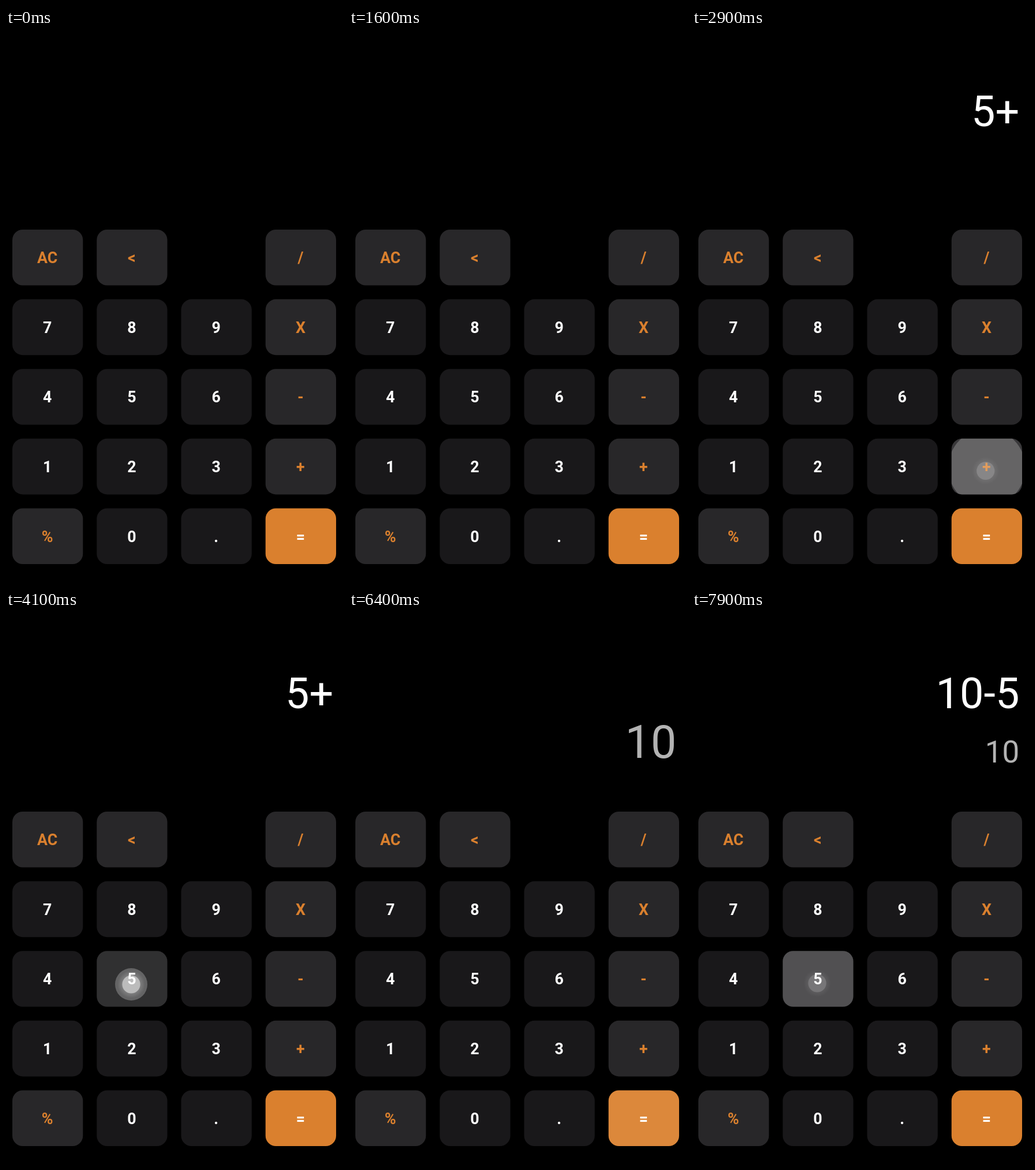
Animation, 584 px wide and 959 px high, one loop 8 s. Source, as an HTML page:

```html
<!DOCTYPE html>
<html lang="en">
<head>
<meta charset="utf-8">
<title>Calculator</title>
<style>
  html, body { margin: 0; width: 100%; height: 100%; overflow: hidden; background: #000; }
  svg { display: block; width: 584px; height: 959px; font-family: Roboto, sans-serif; }
  .label { font-size: 26.8px; font-weight: 700; text-anchor: middle; }
  .display { text-anchor: end; fill: #fff; }
  #result { fill: #b3b3b3; }
</style>
</head>
<body>
<svg viewBox="0 0 584 959">
  <defs>
    <clipPath id="keyClip"><rect id="clipBox"/></clipPath>
    <radialGradient id="glow">
      <stop offset=".6" stop-color="#fff" stop-opacity=".35"/>
      <stop offset="1" stop-color="#fff" stop-opacity="0"/>
    </radialGradient>
  </defs>
  <rect width="584" height="959"/>
  <g id="keys"></g>
  <g id="ink" clip-path="url(#keyClip)" fill="#fff">
    <rect id="highlight" width="584" height="959"/>
    <circle id="ripple"/>
  </g>
  <g id="labels"></g>
  <text id="input" class="display" x="567.4" y="170.3" font-size="73.8"></text>
  <text id="result" class="display" x="567.3"></text>
  <g id="touch">
    <circle r="24" fill="url(#glow)"/>
    <circle r="15.6" fill="#fff"/>
  </g>
</svg>
<script>
const $ = id => document.getElementById(id);
const DURATION = 8000, STEP = 100;
const KEY = { width: 122.3, height: 96.6, rx: 18 };
const ORANGE = '#da802e';
const ROWS = ['AC < _ /', '7 8 9 X', '4 5 6 -', '1 2 3 +', '% 0 . ='];

const set = (el, attrs) => {
  for (const name in attrs) el.setAttribute(name, attrs[name]);
  return el;
};
const add = (parent, tag, attrs) =>
  parent.appendChild(set(document.createElementNS('http://www.w3.org/2000/svg', tag), attrs));

const boxes = {};
ROWS.forEach((row, r) => row.split(' ').forEach((name, c) => {
  if (name === '_') return;
  const box = boxes[name] = { x: 11 + c * 146.25, y: 349 + r * 120.62, ...KEY };
  const isDigit = /[\d.]/.test(name), isEquals = name === '=';
  add($('keys'), 'rect', { ...box, fill: isEquals ? ORANGE : isDigit ? '#19181a' : '#282729' });
  add($('labels'), 'text', {
    class: 'label',
    x: box.x + KEY.width / 2 - .5,
    y: box.y + KEY.height / 2 + 9.8,
    fill: isDigit || isEquals ? '#fff' : ORANGE
  }).textContent = name;
}));

// Each press takes effect at `at`; the finger lands `lead` steps before.
const PRESSES = [
  { at: 1800, lead: 1, key: '5', x: 217, y: 646, input: '5' },
  { at: 2900, lead: 2, key: '+', x: 508.8, y: 766.5, input: '5+', radius: 67 },
  { at: 4200, lead: 2, key: '5', x: 217, y: 648, input: '5+5' },
  { at: 6200, lead: 2, key: '=', x: 510, y: 886, input: '', result: 'large' },
  { at: 7000, lead: 2, key: '-', x: 510, y: 646, input: '10-', result: 'small' },
  { at: 7900, lead: 2, key: '5', x: 217, y: 646, input: '10-5', result: 'small' }
];
const RESULT = {
  large: { 'font-size': 79, y: 256 },
  small: { 'font-size': 53, y: 264 }
};

// Ink by step relative to the press: highlight, ripple opacity, radius, touch dot.
const INK = {
  '-2': [0, 0, 0, .57],
  '-1': [.1, .25, 28, .57],
  '0': [.08, .22, 0, .22],
  '1': [.05, .13, 95, 0],
  '2': [.01, .05, 110, 0]
};

function drawInk(press, step) {
  const [highlight, opacity, radius, dot] = INK[step];
  const box = boxes[press.key];
  // The ripple drifts from the finger towards the key centre as it grows.
  const atFinger = step < 0;
  set($('clipBox'), box);
  set($('highlight'), { opacity: highlight });
  set($('ripple'), {
    cx: atFinger ? press.x : box.x + KEY.width / 2,
    cy: atFinger ? press.y : box.y + KEY.height / 2 + 2,
    r: radius || (step === 0 ? press.radius || 85 : 0),
    opacity: step === 0 && !press.radius ? .18 : opacity
  });
  set($('touch'), { transform: `translate(${press.x} ${press.y})`, opacity: dot });
}

function draw(time) {
  const t = Math.floor(time % DURATION / STEP) * STEP;
  const last = PRESSES.filter(p => p.at <= t).pop() || { input: '' };
  $('input').textContent = last.input;
  $('result').textContent = last.result ? '10' : '';
  if (last.result) set($('result'), RESULT[last.result]);

  const active = PRESSES.find(p => t >= p.at - p.lead * STEP && t < p.at + 3 * STEP);
  const visibility = active ? 'visible' : 'hidden';
  set($('ink'), { visibility });
  set($('touch'), { visibility });
  if (active) drawInk(active, (t - active.at) / STEP);
}

const start = performance.now();
function tick() {
  draw(performance.now() - start);
  requestAnimationFrame(tick);
}
tick();
</script>
</body>
</html>
```
